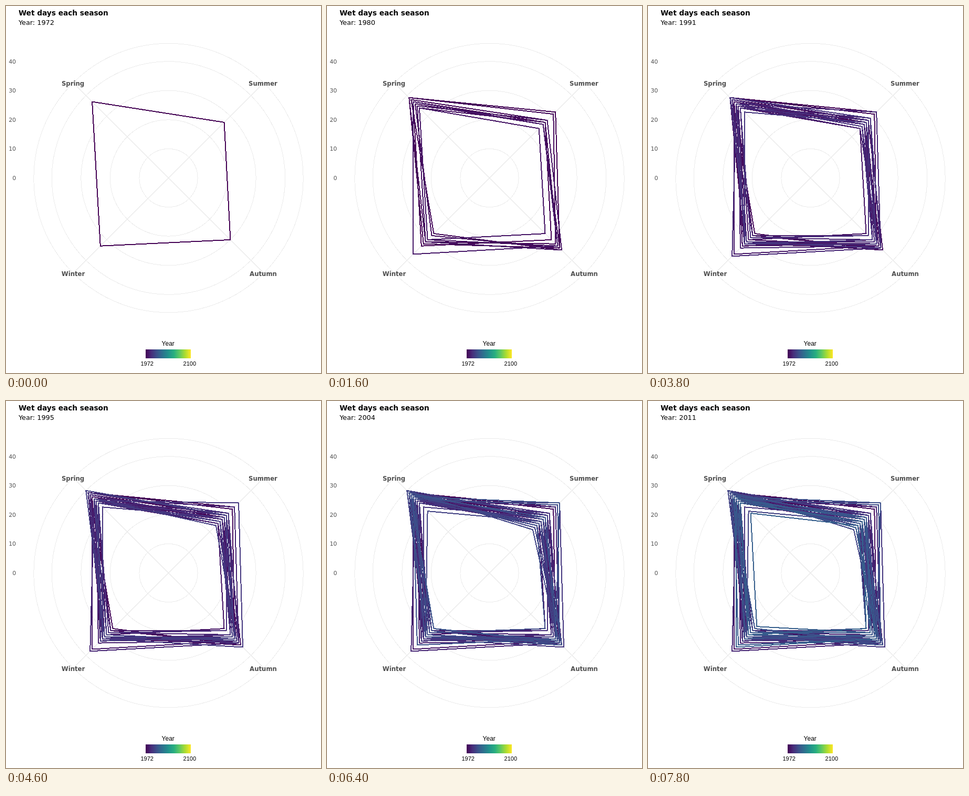
Recreate the animation shown at these times as an HTML page. Size 600 px wide and 700 px high, loop 8 s.

```html
<!DOCTYPE html>
<html lang="en">
<head>
<meta charset="utf-8">
<title>Wet days each season</title>
<style>
  html, body { margin: 0; width: 100%; height: 100%; overflow: hidden; background: #fff; }
  svg { display: block; width: 600px; height: 700px; }
  text { font-family: "DejaVu Sans", sans-serif; fill: #000; }
  .title { font-size: 13.7px; font-weight: bold; }
  .year { font-size: 12.8px; }
  .season { font-size: 11.7px; font-weight: bold; fill: #4d4d4d; text-anchor: middle; }
  .tick { font-size: 10.8px; fill: #4d4d4d; text-anchor: end; }
  .key { font-family: "Liberation Sans", sans-serif; font-size: 11px; text-anchor: middle; }
  .head { font-size: 12px; }
  .grid, .data { fill: none; shape-rendering: crispEdges; }
  .grid { stroke: #ebebeb; stroke-width: 1; }
  .data { stroke-width: 2; stroke-linejoin: round; }
</style>
</head>
<body>
<svg id="stage" viewBox="0 0 600 700"></svg>
<script>
const stage = document.getElementById('stage');
const CX = 309.5, CY = 328, UNIT = 5.557, OUTER = 256.7;
const FIRST = 1972, LAST = 2100, STEP = 200;
const VIRIDIS = ['#440154', '#472d7b', '#3b528b', '#2c728e', '#21918c',
                 '#28ae80', '#5ec962', '#addc30', '#fde725'];

// Days per year: spring, summer, autumn, winter. Empty years get a typical value.
const days = [
  [37, 27, 30, 33], [39, 32, 34, 32], [38, 28, 35, 27], [39, 31, 32, 31],
  [36, 26, 34, 28], [34, 27, 33, 30], [35, 28, 35, 31], [34, 24, 27, 30],
  [37, 26, 33, 37], [36, 25, 32, 33], [39, 28, 28, 28], [35, 24, 33, 34],
  [], [36, 32, 34, 38], [35, 29, 32, 32], [],
  [34, 28, 28, 29], [], [39, 29, 34, 31], [32, 27, 32, 32],
  [35, 34, 36, 32], [], [36, 23, 33, 30], [40, 28, 32, 31],
  [30, 25, 33, 31], [39, 22, 34, 27], [40, 21, 33, 30], [37, 24, 35, 28],
  [38, 23, 27, 29], [36, 33, 34, 30], [39, 26, 35, 31], [37, 34, 32, 35],
  [38, 27, 33, 27], [], [], [],
  [37, 22, 32, 35], [36, 26, 32, 36], [29, 23, 29, 26], [34, 25, 27, 30]
];

let seed = 11;
function rand() {
  seed = (seed * 16807) % 2147483647;
  return seed / 2147483647;
}
const typical = () => [36, 26, 31, 31].map(v => v - 2 + Math.floor(rand() * 5));

function add(tag, attrs, text, parent = stage) {
  const el = document.createElementNS('http://www.w3.org/2000/svg', tag);
  for (const k in attrs) el.setAttribute(k, attrs[k]);
  if (text !== undefined) el.textContent = text;
  parent.appendChild(el);
  return el;
}
const label = (cls, x, y, text) => add('text', { class: cls, x, y }, text);

function colour(t) {
  const p = t * (VIRIDIS.length - 1), i = Math.min(Math.floor(p), VIRIDIS.length - 2);
  const part = (hex, k) => parseInt(hex.slice(k, k + 2), 16);
  const mix = [1, 3, 5].map(k => {
    const a = part(VIRIDIS[i], k), b = part(VIRIDIS[i + 1], k);
    return Math.round(a + (b - a) * (p - i));
  });
  return `rgb(${mix})`;
}

function outline(values) {
  const dirs = [[-1, -1], [1, -1], [1, 1], [-1, 1]];
  return values.map((v, i) => {
    const d = v * UNIT * Math.SQRT1_2;
    return `${(CX + dirs[i][0] * d).toFixed(1)},${(CY + dirs[i][1] * d).toFixed(1)}`;
  }).join(' ');
}

// Grid
for (const r of [10, 20, 30, 40].map(v => v * UNIT).concat(OUTER))
  add('circle', { class: 'grid', cx: CX, cy: CY, r });
const arm = OUTER * Math.SQRT1_2;
for (const s of [-1, 1])
  add('line', { class: 'grid', x1: CX - arm, y1: CY - s * arm, x2: CX + arm, y2: CY + s * arm });

// One outline per year
const shapes = days.map((row, i) => add('polygon', {
  class: 'data',
  points: outline(row.length ? row : typical()),
  stroke: colour(i / (LAST - FIRST))
}));

// Text
label('title', 24, 18, 'Wet days each season');
const yearText = label('year', 24, 36, '');
for (let v = 0; v <= 40; v += 10) label('tick', 19, CY + 4 - v * UNIT, v);
label('season', 127.5, 152, 'Spring');
label('season', 489.5, 152, 'Summer');
label('season', 490, 515, 'Autumn');
label('season', 128, 515, 'Winter');

// Colour key
const ramp = add('linearGradient', { id: 'ramp' }, undefined, add('defs', {}));
VIRIDIS.forEach((c, i) =>
  add('stop', { offset: i / (VIRIDIS.length - 1), 'stop-color': c }, undefined, ramp));
add('rect', { x: 266, y: 655, width: 86, height: 17, fill: 'url(#ramp)' });
label('key head', 308.7, 648, 'Year');
label('key', 268.7, 686, FIRST);
label('key', 349.8, 686, LAST);

function draw(ms) {
  const now = Math.floor(ms / STEP) % days.length;
  yearText.textContent = `Year: ${FIRST + now}`;
  shapes.forEach((s, i) => s.setAttribute('visibility', i <= now ? 'visible' : 'hidden'));
}

const start = performance.now();
function tick() {
  draw(performance.now() - start);
  requestAnimationFrame(tick);
}
tick();
</script>
</body>
</html>
```
